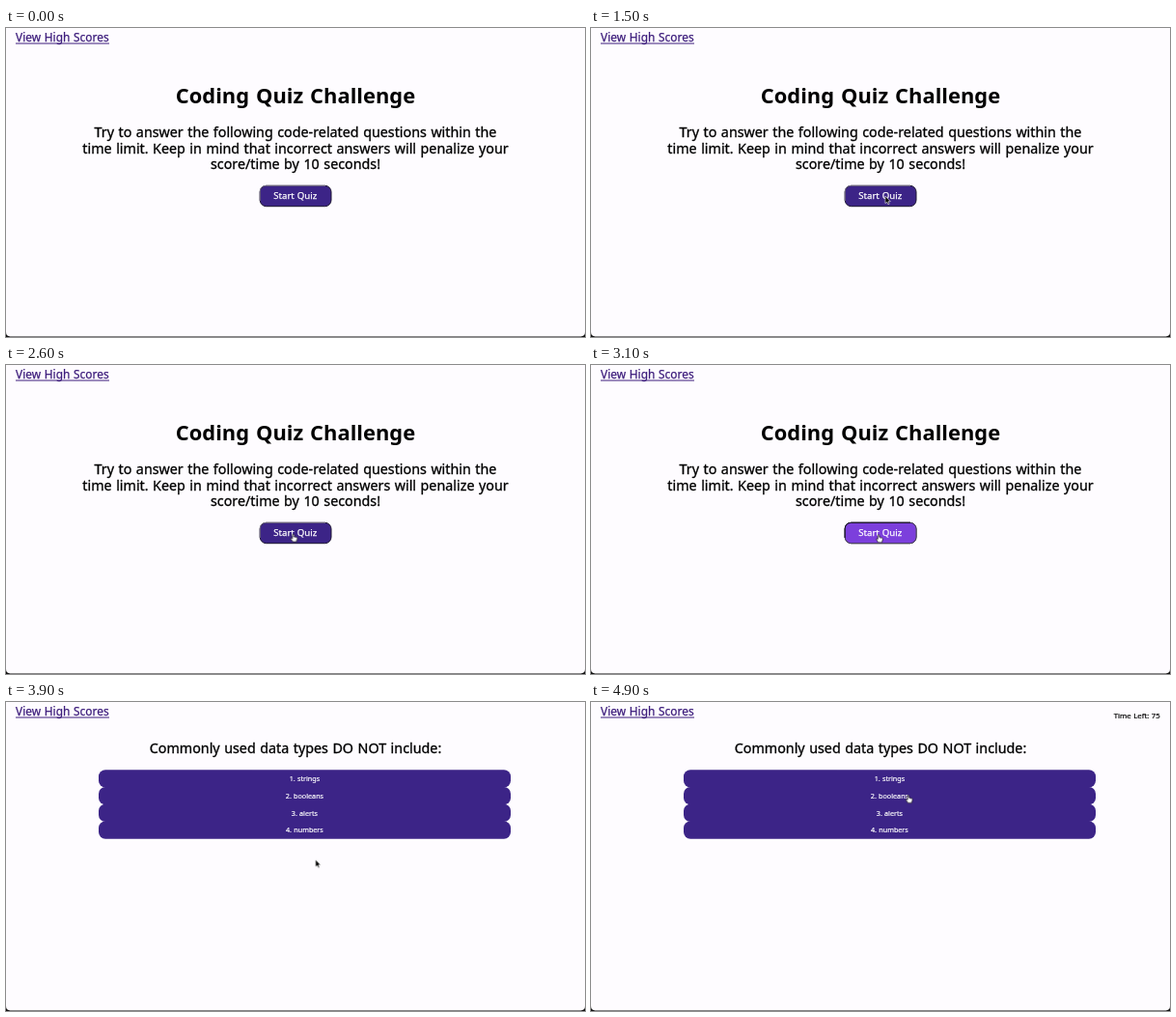
An HTML page that plays this animation: 600 by 320 pixels, repeating every 5000 ms.

```html
<!DOCTYPE html>
<html lang="en">
<head>
<meta charset="utf-8">
<title>Coding Quiz</title>
<style>
  html, body { margin: 0; width: 100%; height: 100%; overflow: hidden; background: #fefcff; }
  svg { display: block; width: 600px; height: 320px; }
  text { font-family: "Noto Sans", "Open Sans", sans-serif; word-spacing: .056em; fill: #000; }
  .mid { text-anchor: middle; }
  .link { font-size: 11.9px; fill: #3d1d7c; stroke: #3d1d7c; stroke-width: .25px; }
  .title { font-size: 21.9px; font-weight: 700; }
  .body { font-size: 14.3px; stroke: #000; stroke-width: .3px; }
  .start { font-size: 9.6px; fill: #fff; stroke: #fff; stroke-width: .25px; }
  .option text { font-size: 7.2px; fill: #fff; stroke: #fff; stroke-width: .2px; }
  .option rect, .idle { fill: #3c2487; }
  .pressed { fill: #7c3fdc; }
  .timer { font-size: 7.8px; text-anchor: end; stroke: #000; stroke-width: .2px; }

  /* 1% = 50 ms; the tiny lead keeps hard cuts on their exact tick */
  .anim { animation: 5s step-end -5ms infinite; }
  .intro { animation-name: intro; }
  .quiz { animation-name: quiz; }
  .press { animation-name: press; }
  .clock { animation-name: clock; }
  .pointer { animation-name: move; }
  .arrow { animation-name: arrow; }
  .hand { animation-name: hand; }

  @keyframes intro { 0% { visibility: visible } 64%, 100% { visibility: hidden } }
  @keyframes quiz { 0% { visibility: hidden } 64%, 100% { visibility: visible } }
  @keyframes press { 0% { opacity: 0 } 62% { opacity: 1 } 64%, 100% { opacity: 0 } }
  @keyframes clock { 0% { visibility: hidden } 84%, 100% { visibility: visible } }
  @keyframes arrow {
    0% { visibility: hidden } 10% { visibility: visible } 34% { visibility: hidden }
    64% { visibility: visible } 84%, 100% { visibility: hidden }
  }
  @keyframes hand {
    0% { visibility: hidden } 34% { visibility: visible }
    64% { visibility: hidden } 84%, 100% { visibility: visible }
  }
  @keyframes move {
    0% { transform: translate(287px, 187px) }
    14% { transform: translate(287px, 187px); animation-timing-function: steps(2) }
    18% { transform: translate(310.5px, 174px) }
    22% { transform: translate(310.5px, 174px); animation-timing-function: steps(6) }
    34% { transform: translate(302px, 174px) }
    42% { transform: translate(302px, 174px) }
    44% { transform: translate(295.5px, 172px); animation-timing-function: steps(5) }
    54% { transform: translate(298px, 175.5px) }
    70% { transform: translate(298px, 175.5px); animation-timing-function: steps(6) }
    82% { transform: translate(332px, 157px); animation-timing-function: steps(2) }
    86% { transform: translate(365.5px, 83.3px); animation-timing-function: steps(4) }
    94% { transform: translate(330px, 98px); animation-timing-function: steps(2) }
    98%, 100% { transform: translate(328.7px, 96.3px) }
  }
</style>
</head>
<body>
<svg viewBox="0 0 600 320">
  <defs>
    <rect id="box" x="263.2" y="163.3" width="73.8" height="21.4" rx="6.500"/>
    <path id="edge" d="M263.2 179V169.800Q263.2 163.3 269.700 163.3H331"/>
  </defs>
  <rect width="600" height="320" fill="#111"/>
  <path d="M0 0H600V315Q600 319.4 595.6 319.4H4.400Q0 319.4 0 315Z" fill="#fefcff"/>

  <text class="link" x="10" y="14.2">View High Scores</text>
  <path d="M10 16H107" stroke="#3d1d7c" stroke-width="1"/>

  <g class="anim intro">
    <text class="title mid" x="300" y="78">Coding Quiz Challenge</text>
    <g class="body mid">
      <text x="300" y="113">Try to answer the following code-related questions within the</text>
      <text x="300" y="129.6">time limit. Keep in mind that incorrect answers will penalize your</text>
      <text x="300" y="146.2">score/time by 10 seconds!</text>
    </g>
    <g fill="none">
      <use href="#box" class="idle" stroke="#1c1530"/>
      <use href="#edge" stroke="#77708a"/>
    </g>
    <g class="anim press" fill="none">
      <use href="#box" class="pressed" stroke="#4a4458"/>
      <use href="#edge" stroke="#17102a"/>
    </g>
    <text class="start mid" x="299.8" y="177.4">Start Quiz</text>
  </g>

  <g class="anim quiz">
    <text class="body mid" x="300" y="53.4">Commonly used data types DO NOT include:</text>
    <g class="option mid" id="options"></g>
  </g>

  <g class="anim clock"><text class="timer" x="589.7" y="17.3">Time Left: 75</text></g>

  <g class="anim pointer">
    <g class="anim arrow">
      <path d="M0 0V7.600L1.800 6.200L3 8.800L4.200 8.200L3.100 5.700H5.400Z" fill="#000" stroke="#fff" stroke-width=".6"/>
    </g>
    <g class="anim hand">
      <path d="M-.8 .8Q0 -.5 .8 .8V3L3.600 3.500Q4.500 3.900 4.300 5.200L3.500 8.200H-.3L-2.300 5.300Q-2.500 4.200 -1.500 4.500L-.8 5.100Z"
            fill="#fff" stroke="#111" stroke-width=".7"/>
    </g>
  </g>
</svg>
<script>
  const pitch = 17.75;
  // Rows overlap slightly so that no seam shows between them.
  document.getElementById("options").innerHTML =
    ["strings", "booleans", "alerts", "numbers"].map((label, i) => {
      const top = 70.3 + i * pitch;
      return `<rect x="96" y="${top}" width="427" height="${pitch + 0.4}" rx="7"/>
        <text x="309.4" y="${top + 11.8}">${i + 1}. ${label}</text>`;
    }).join("");
</script>
</body>
</html>
```
